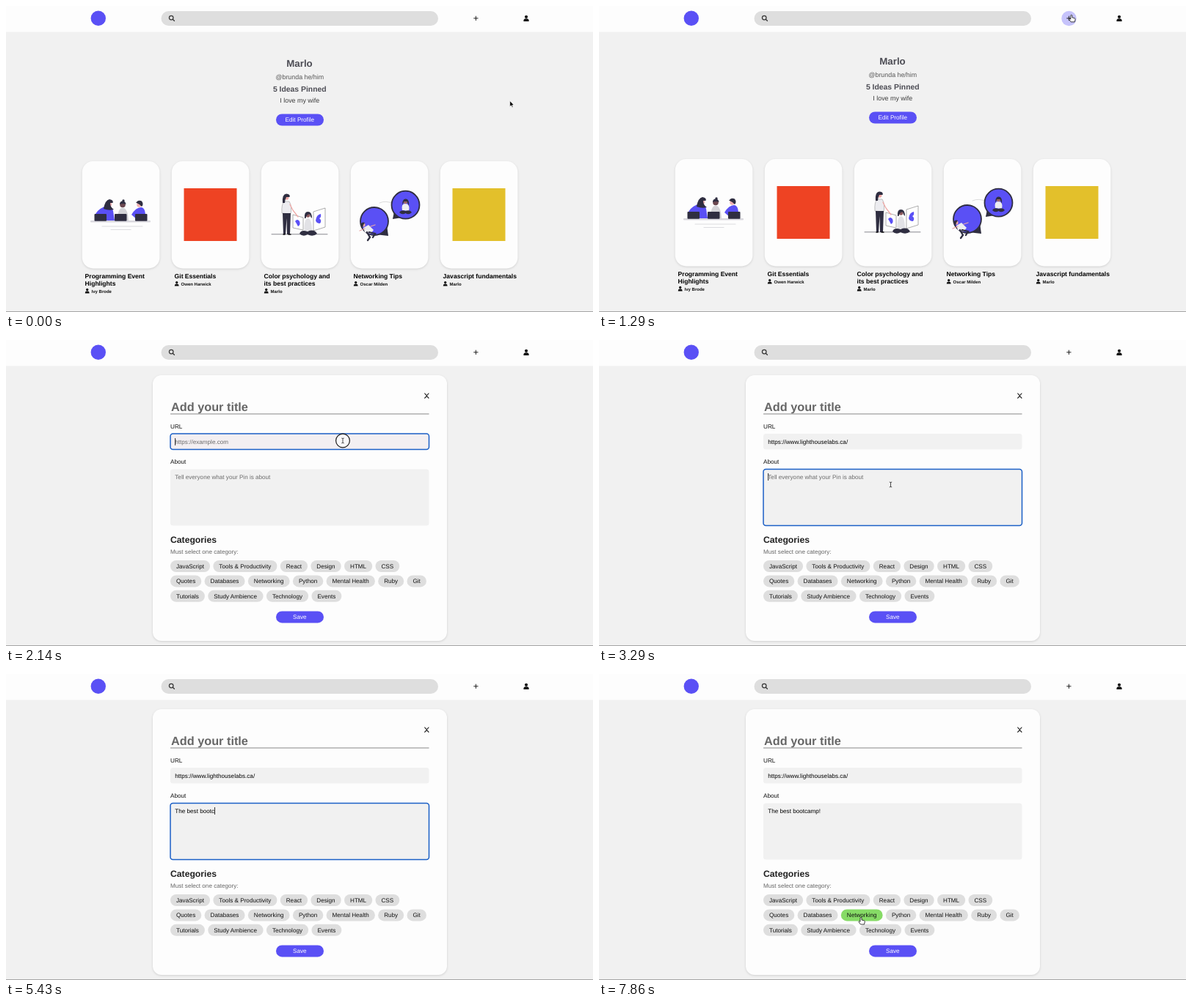
Animation of 800 by 418 pixels, one loop 8 s. Source, as an HTML page:

```html
<!DOCTYPE html>
<html lang="en">
<head>
<meta charset="utf-8">
<title>Pin board</title>
<style>
  html, body { margin: 0; width: 100%; height: 100%; overflow: hidden; background: #f1f1f1; }
  svg { display: block; font-family: "Liberation Sans", Arial, sans-serif; text-rendering: geometricPrecision; white-space: pre; }
  .card { fill: #fdfdfd; filter: drop-shadow(0 1.2px 1.6px #0002); }
</style>
</head>
<body>
<svg id="stage" width="800" height="418" viewBox="0 0 800 418"></svg>
<script>
const PURPLE = '#5a50f5', DARK = '#2f2e41', CHIP = '#dedede', BLUE = '#1b5fc6', SMALL = 8.15;
const stage = document.getElementById('stage');
const $ = id => document.getElementById(id);

const text = (s, x, y, size, fill = '#111', more = '') =>
  `<text x="${x}" y="${y}" font-size="${size}" fill="${fill}" ${more}>${s}</text>`;
const BOLD = 'font-weight="700" ', MID = 'text-anchor="middle"';
const rect = (x, y, w, h, r, fill, more = '') =>
  `<rect x="${x}" y="${y}" width="${w}" height="${h}" rx="${r}" fill="${fill}" ${more}/>`;
const circle = (x, y, r, fill, more = '') => `<circle cx="${x}" cy="${y}" r="${r}" fill="${fill}" ${more}/>`;
const path = (d, fill, more = '') => `<path d="${d}" fill="${fill}" ${more}/>`;
const line = (d, stroke, w) => path(d, 'none', `stroke="${stroke}" stroke-width="${w}" stroke-linecap="round"`);
const group = (id, body, more = '') => `<g id="${id}" ${more}>${body}</g>`;
const pen = document.createElement('canvas').getContext('2d');
const widthOf = s => {
  pen.font = '100px "Liberation Sans", Arial, sans-serif';
  return pen.measureText(s).width * SMALL / 100;
};

const user = (x, y, s) => `<g transform="translate(${x} ${y}) scale(${s})">` +
  circle(0, -2.1, 2.1, '#111') + path('M-3.6 4V3.2Q-3.6.3-.8.3H.8Q3.6.3 3.6 3.2V4Z', '#111') + '</g>';
const button = (label, y) => rect(368, y, 65, 16, 8, PURPLE) + text(label, 400.3, y + 10.7, 8.2, '#fff', MID);

const nav = rect(0, 0, 800, 35.5, 0, '#fdfdfd') + circle(125.8, 16.8, 10.2, PURPLE) +
  rect(211.5, 7, 377.5, 20, 10, CHIP) +
  circle(225.2, 16.1, 2.8, 'none', 'stroke="#333" stroke-width="1.2"') + line('M227.3 18.2L229.4 20.3', '#333', 1.3) +
  circle(640.5, 17, 10.2, '#c6c3fb', 'id="hover"') +
  line('M637.7 16.8H643.1M640.4 14.1V19.5', '#222', 1) + user(709, 16.9, 1);

// Profile page
const meeting = rect(115, 290, 82, 2.6, 1, '#d9d8de') + line('M131 298H186M143 302.5H170', '#dcdce0', 1.2) +
  path('M121 284Q123 276 134 271Q144 268 146 277L148 290H131L124 289Z', PURPLE) +
  circle(141, 268, 3.1, '#f0b0b0') + path('M133 274Q135 262 141 261Q147 262 145.5 266L142 266Q142 272 147 275Q140 277 133 274Z', DARK) +
  path('M152 290Q152 273 159 272.5Q166 273 167 290Z', '#d4d4d8') +
  circle(159, 268.5, 3.8, '#6b4850') + path('M155 268Q155 263.5 159 263.5T163.5 268Q160 266 155 268Z', DARK) + circle(160, 263, 1.7, DARK) +
  path('M171 282Q177 272 184 272Q191 272 190 290H180Z', PURPLE) +
  circle(181.5, 268.5, 3.2, '#f0b0b0') + path('M177 266Q180 261 185 263.5Q188 268 185 271Q183 268 178 266Z', DARK) +
  [120.5, 148, 176].map(x => rect(x, 281, 16.5, 9.8, 1, DARK)).join('');

const designers = line('M362 308.8H438', '#55555f', .7) +
  path('M391 282L405 286V303L391 300ZM419 278L435 273V299L419 304Z', '#fff', 'stroke="#777" stroke-width=".6"') +
  path('M394 291q3-4 6 0q2 5-2 7q-2-4-4-7M422 290q1-8 7-9q1 5-2 6q4 3 1 7q-5 0-6-4', PURPLE) +
  path('M376 280Q375 266 380 264L386 264Q390 270 388 281Z', '#ececf0', 'stroke="#888" stroke-width=".5"') +
  path('M377 280H388L387 309H383L382.5 287L381 309H378Z', DARK) + line('M378 309H380M385 309H388', '#111', 1.4) +
  line('M387 268L391 276L398 285', '#f0a9a6', 1.3) +
  circle(382.5, 259, 2.8, '#f0a9a6') + path('M377 266Q376 254 382 253.5Q388 254 386.5 258L382 258Q380 262 380 266Z', DARK) +
  path('M406.5 304Q406 288 411.5 287Q417 288 417 304Z', '#e2e2e6') +
  circle(411.5, 283, 2.8, '#8d5a5e') + path('M407 287Q406 278 411.5 278Q417 278 417 287Q414.5 285 414 281.5Q409.5 281 408.5 287Z', DARK) +
  path('M400 308Q402 302 411 305Q420 301 424 308Q418 313 411 309Q405 313 400 308Z', DARK);

const chat = line('M509 266Q518 262 527 267', '#bbb', .5) +
  [[502, 291, 'M519 296L521 311L505 309Z'], [544.5, 268.7, 'M529 278L527 288L540 286Z']].map(([x, y, tail]) =>
    path(tail, DARK) + circle(x, y, 19, PURPLE, `stroke="${DARK}" stroke-width="1.8"`)).join('') +
  path('M487 300L494 296L501 303L497 308L489 306Z', '#ededf1') + circle(487, 296, 2.6, '#eaa8a5') +
  path('M483 296Q485 291 489 293L487 296L486 300Z', DARK) + line('M495 306L503 308L500 313M492 306L496 313L493 317', DARK, 2.3) +
  line('M489 301L482 304M497 298L503 296', '#eaa8a5', 1.3) +
  path('M540 276Q538 267 544.5 267Q551 267 549 277Z', '#ededf1') + circle(544.5, 264.5, 2.7, '#9b666a') +
  path('M540 269Q540 260 545 260.5Q550 261 549 270L546.5 264H542.5Z', DARK) +
  path('M536 279Q538 275 544.5 277Q551 275 553 279Q549 283 544.5 280Q540 283 536 279Z', DARK);

const pins = [
  [['Programming Event', 'Highlights'], 'Ivy Brode', meeting],
  [['Git Essentials'], 'Owen Harwick', rect(242.5, 246, 72, 72, 0, '#ee4323')],
  [['Color psychology and', 'its best practices'], 'Marlo', designers],
  [['Networking Tips'], 'Oscar Milden', chat],
  [['Javascript fundamentals'], 'Marlo', rect(608.5, 246, 72, 72, 0, '#e3c02b')]
];
const pinCard = ([lines, author, art], i) => {
  const x = 103.8 + 122 * i, y = 369 + 9.8 * (lines.length - 1);
  return rect(x, 209, 105.6, 146.5, 15, '', 'class="card"') + art +
    lines.map((s, n) => text(s, x + 3.8, 368.8 + 9.8 * n, 8.57, '#000', BOLD)).join('') +
    user(x + 6.9, y + 7.4, .8) + text(author, x + 12.8, y + 9.7, 6, '#111', BOLD);
};
const profile = text('Marlo', 400, 80.3, 13.3, '#4d4d55', BOLD + MID) +
  text('@brunda he/him', 400.3, 96.5, 8.85, '#555', MID) +
  text('5 Ideas Pinned', 400.3, 113.6, 10.4, '#4d4d55', BOLD + MID) +
  text('I love my wife', 400.2, 129.2, 8.9, '#3c3c3c', MID) +
  button('Edit Profile', 144.5) + pins.map(pinCard).join('');

// Form
const topics = ['JavaScript', 'Tools &amp; Productivity', 'React', 'Design', 'HTML', 'CSS', 'Quotes', 'Databases',
  'Networking', 'Python', 'Mental Health', 'Ruby', 'Git', 'Tutorials', 'Study Ambience', 'Technology', 'Events'];
let chipX = 224, chipY = 301;
const chips = topics.map(s => {
  const w = widthOf(s.replace('&amp;', '&')) + 16;
  if (chipX + w > 577) { chipX = 224; chipY += 20.4; }
  const chip = rect(chipX, chipY, w, 16, 8, CHIP, `id="chip${s.slice(0, 3)}"`) + text(s, chipX + 8, chipY + 10.8, SMALL);
  chipX += w + 4.3;
  return chip;
}).join('');
const form = rect(200, 48, 401, 363, 12, '', 'class="card"') +
  line('M570.7 73L576 79.4M576 73L570.7 79.4', '#111', 1.1) +
  text('Add your title', 225, 97, 16.3, '#666', BOLD) + rect(224, 100.5, 352.5, 1, 0, '#888') +
  text('URL', 224, 121, 8.2) + rect(224, 128, 352.5, 21.5, 3.5, '#f1f1f1', 'id="url"') +
  text('', 230.3, 141.7, SMALL, '', 'id="urlText"') +
  text('About', 224, 169.3, 8.2) + rect(224, 176.6, 352.5, 77, 3.5, '#f1f1f1', 'id="about"') +
  text('', 230.3, 189.6, SMALL, '', 'id="aboutText"') +
  rect(0, 0, .8, 10, 0, '#000', 'id="caret"') +
  text('Categories', 224, 277, 12.2, '#222', BOLD) + text('Must select one category:', 224, 292, SMALL, '#666') +
  chips + button('Save', 370.4);

// Pointers, drawn with the hot spot at the origin
const outline = 'stroke="#fff" stroke-width=".7"';
const pointers = {
  arrow: path('M0 0V8L1.9 6.3L3.1 9L4.4 8.4L3.2 5.8H5.6Z', '#000', outline),
  hand: path('M-1 1Q0-.5 1 1V4L4.4 4.8Q5.6 5.2 5.2 7L4.5 10H-.6L-3.2 6.4Q-2.6 5-1 6.3Z', '#fff', 'stroke="#111" stroke-width=".8"'),
  beam: line('M-1.3-3.4Q0-3.4 0-2.6Q0-3.4 1.3-3.4M0-2.6V2.6M-1.3 3.4Q0 3.4 0 2.6Q0 3.4 1.3 3.4', '#222', .8)
};

stage.innerHTML = rect(0, 0, 800, 418, 0, '#f1f1f1') + group('profile', profile) + group('form', form) + nav +
  rect(0, 417, 800, 1, 0, '#a5a5a5') +
  group('bar', rect(795.5, 0, 4.5, 418, 0, '#f7f7f7') + rect(796.2, 3, 3.6, 415, 1.8, '#828282')) +
  group('pointer', circle(0, 0, 9.4, '#fff8', 'id="ring" stroke="#1a1a1a" stroke-width="1.2"') +
    Object.entries(pointers).map(([id, d]) => group(id, d)).join(''));

// Time runs in steps of 1/7 s; each key is [step, x, y, pointer until the next key]
const LOOP = 8000, STEPS = 56;
const route = [
  [0, 686.7, 129.5, 'arrow'], [4, 686.7, 129.5, 'arrow'], [8, 651, 30, 'arrow'], [9, 643.8, 11.8, 'hand'],
  [11, 643.8, 11.8, 'arrow'], [14, 459, 137.5, 'beam'], [16, 459, 137.5, ''], [19, 459, 137.5, 'beam'],
  [22, 397.5, 197.5, 'beam'], [26, 397.5, 197.5, ''], [42, 397.5, 197.5, 'beam'], [45, 388, 262, 'arrow'],
  [48, 357, 332, 'hand'], [STEPS, 357, 332, 'hand']
];
const clicks = [10, 15, 22, 50];
const address = 'https://www.lighthouselabs.ca/', note = 'The best bootcamp!';
const typed = k => k < 26 ? 0 : k <= 38 ? Math.round(1 + (k - 26) * 13 / 12) : 14 + 2 * (k - 38);

const set = (id, attrs) => { for (const a in attrs) $(id).setAttribute(a, attrs[a]); };
const show = (id, on) => set(id, { visibility: on ? 'inherit' : 'hidden' });
const focus = (id, on) => set(id, { stroke: on ? BLUE : 'none', 'stroke-width': 1.5 });
function field(id, value, hint) {
  $(id).textContent = value || hint;
  set(id, { fill: value ? '#000' : '#6b6b6b' });
}

function draw(k) {
  const onForm = k >= 11, inUrl = k >= 15 && k < 22, inAbout = k >= 22 && k < 50;
  show('profile', !onForm);
  show('form', onForm);
  set('profile', { transform: `translate(0 ${[3, 2, .5][k] || 0})` });
  set('bar', { opacity: k < 1 || k > 7 ? 0 : k < 7 ? 1 : .5 });
  show('hover', k >= 9 && k < 11);

  const url = k >= 17 ? address : '', about = note.slice(0, typed(k));
  field('urlText', url, 'https://example.com');
  field('aboutText', about, 'Tell everyone what your Pin is about');
  focus('url', inUrl);
  focus('about', inAbout);
  set('url', { fill: inUrl ? '#f3eff2' : '#f1f1f1' });
  show('caret', inUrl || inAbout);
  set('caret', { x: 230.3 + widthOf(inUrl ? url : about), y: inUrl ? 134 : 182 });
  set('chipNet', { fill: k >= 50 ? '#86db66' : CHIP });

  const i = route.findIndex((r, n) => k >= r[0] && k < route[n + 1][0]);
  const [t0, x0, y0, kind] = route[i], [t1, x1, y1] = route[i + 1];
  const p = (k - t0) / (t1 - t0);
  set('pointer', { transform: `translate(${x0 + (x1 - x0) * p} ${y0 + (y1 - y0) * p})` });
  for (const id in pointers) show(id, id === kind);
  show('ring', clicks.includes(k));
}

function tick() {
  draw(Math.floor(performance.now() % LOOP * STEPS / LOOP + .03) % STEPS);
  requestAnimationFrame(tick);
}
tick();
</script>
</body>
</html>
```
